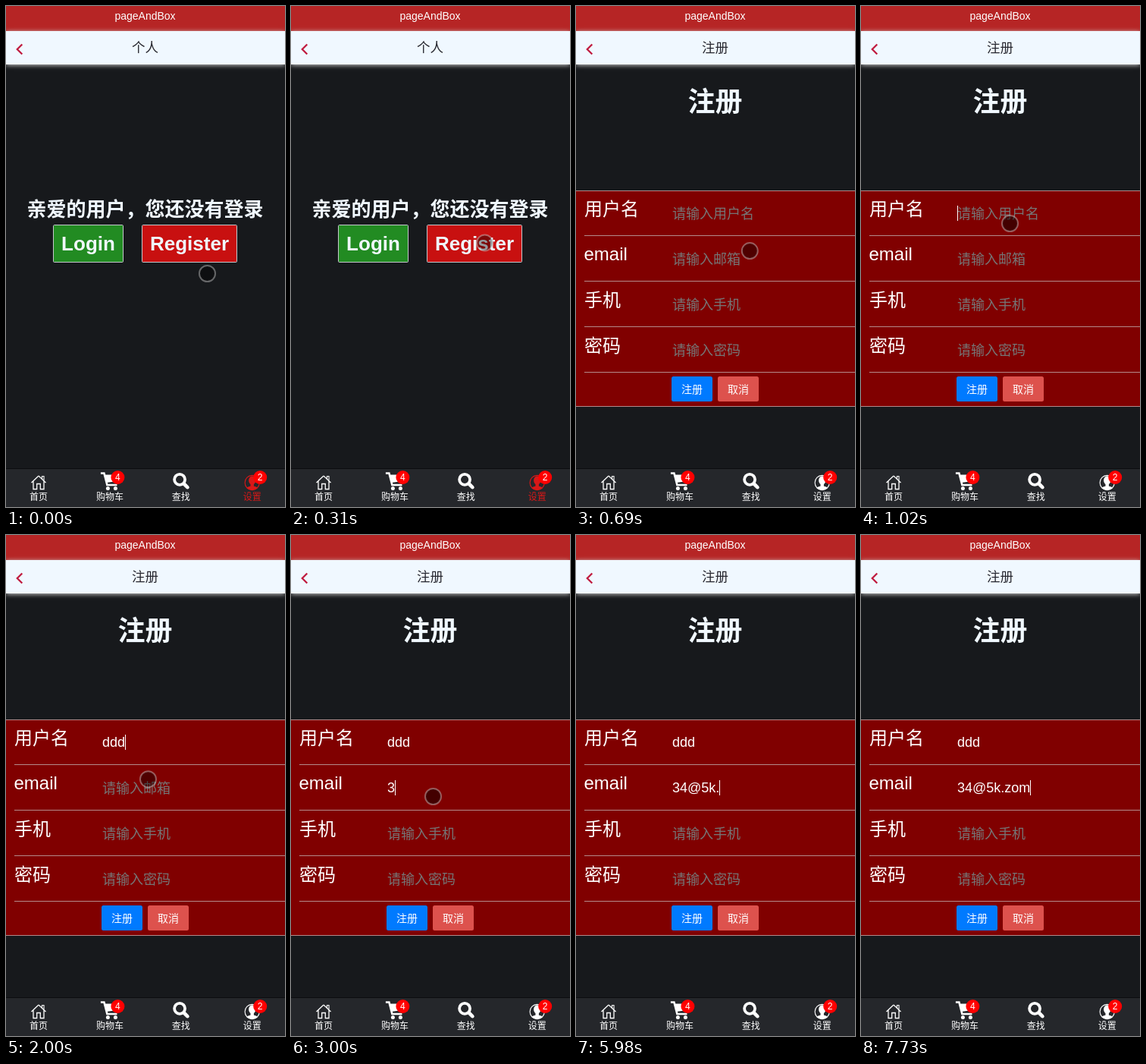
Animation of 368x660 px, one loop 8 s. Source, as an HTML page with a canvas:

```html
<!DOCTYPE html>
<html lang="zh-CN">
<head>
<meta charset="utf-8">
<title>注册</title>
<style>
html, body { margin: 0; width: 100%; height: 100%; overflow: hidden; background: #17191c; }
canvas { display: block; width: 368px; height: 660px; }
</style>
</head>
<body>
<canvas id="stage"></canvas>
<script>
const W = 368, H = 660, LOOP = 8000, BLINK = 505, HIDE_POINTER = 4350;
const FONT = '"Liberation Sans", Arial, "Noto Sans CJK SC", "Noto Sans CJK", sans-serif';
const ICE = '#f0f8ff', WHITE = '#fff', LINE = '#b48a8a';

const canvas = document.getElementById('stage');
const ctx = canvas.getContext('2d');
const dpr = window.devicePixelRatio || 1;
canvas.width = W * dpr;
canvas.height = H * dpr;

// Pointer: move along a curve, then tap. Each move starts where the last one ended.
const HOME = { x: 265.5, y: 352.5 };
const MOVES = [
  { start: 0, end: 330, tap: 360, bend: { x: 260, y: 332 }, to: { x: 255.5, y: 311.5 } },
  { start: 480, end: 870, tap: 1020, bend: { x: 240, y: 350 }, to: { x: 196.5, y: 286.5 } },
  { start: 1740, end: 2260, tap: 2310, bend: { x: 183, y: 327.5 }, to: { x: 187.5, y: 344.5 } }
];
const [openTap, nameTap, emailTap] = MOVES.map(m => m.tap);

// Evenly typed bursts of characters
const burst = (start, gap, str) => [...str].map((char, i) => ({ char, at: start + i * gap }));

const FIELDS = [
  { label: '用户名', hint: '请输入用户名', focus: nameTap, blur: emailTap, keys: burst(1290, 215, 'ddd') },
  { label: 'email', hint: '请输入邮箱', focus: emailTap, blur: LOOP,
    keys: [burst(3000, 480, '34'), burst(4480, 0, '@'), burst(5500, 240, '5k.'), burst(7270, 230, 'zom')].flat() },
  { label: '手机', hint: '请输入手机', keys: [] },
  { label: '密码', hint: '请输入密码', keys: [] }
];

const clamp = v => Math.min(1, Math.max(0, v));
const smooth = u => u * u * (3 - 2 * u);
const bezier = (a, b, c, u) => (1 - u) * (1 - u) * a + 2 * u * (1 - u) * b + u * u * c;

function rect(x, y, w, h, fill) {
  ctx.fillStyle = fill;
  ctx.fillRect(x, y, w, h);
}

function text(str, x, y, size, color, align = 'left', weight = 400) {
  ctx.font = `${weight} ${size}px ${FONT}`;
  ctx.textAlign = align;
  ctx.fillStyle = color;
  ctx.fillText(str, x, y);
}

// Places Chinese text by its vertical middle
function hanzi(str, x, mid, size, color, align, weight) {
  text(str, x, mid + size * 0.38, size, color, align, weight);
}

function button(label, x, y, w, h, size, fill, border) {
  ctx.beginPath();
  ctx.roundRect(x, y, w, h, 2.5);
  ctx.fillStyle = border || fill;
  ctx.fill();
  if (border) rect(x + 1, y + 1, w - 2, h - 2, fill);
  text(label, x + w / 2, y + h / 2 + size * 0.36, size, border ? ICE : WHITE, 'center', border ? 700 : 500);
}

function disc(x, y, rx, color, ry = rx) {
  ctx.beginPath();
  ctx.ellipse(x, y, rx, ry, 0, 0, Math.PI * 2);
  ctx.fillStyle = color;
  ctx.fill();
}

function ring(x, y, r, color, width) {
  ctx.beginPath();
  ctx.arc(x, y, r, 0, Math.PI * 2);
  ctx.strokeStyle = color;
  ctx.lineWidth = width;
  ctx.stroke();
}

function line(path, color, width) {
  ctx.strokeStyle = color;
  ctx.lineWidth = width;
  ctx.stroke(new Path2D(path));
}

function header(title) {
  rect(0, 0, W, 33, '#b62525');
  ctx.save();
  ctx.shadowColor = '#ccc';
  ctx.shadowBlur = 6 * dpr;
  ctx.shadowOffsetY = dpr;
  rect(0, 33, W, 44, ICE);
  ctx.restore();
  text('pageAndBox', 183.5, 18, 14, WHITE, 'center');
  hanzi(title, 183.5, 54.5, 17.5, '#26262e', 'center');
  line('M21.3 50.5l-6.5 6.5l6.5 6.5', '#c01c40', 2.3);
}

// Icons are drawn around the origin
function homeIcon(color) {
  for (const side of [1, -1]) {
    ctx.save();
    ctx.scale(side, 1);
    line('M0-9l9.5 9M7-2v10.5h-4.7v-7h-2.3', color, 1.3);
    ctx.restore();
  }
  line('M4.5-5v-3.5h2.5v6', color, 1.1);
}

function cartIcon(color) {
  line('M-12-12.5h4.5l4 15.5h13', color, 2.6);
  ctx.fillStyle = color;
  ctx.fill(new Path2D('M-6.5-10.5h17.5l-2 8.5l-13.5 2z'));
  for (const x of [-2.5, 7.5]) disc(x, 7.5, 2.5, color);
}

function searchIcon(color) {
  ring(-1.7, -4.2, 7, color, 3.8);
  ctx.lineCap = 'round';
  line('M4 1.5l4.6 4.6', color, 4.6);
  ctx.lineCap = 'butt';
}

function personIcon(color) {
  ctx.save();
  ctx.beginPath();
  ctx.arc(0, 0, 10, 0, Math.PI * 2);
  ctx.clip();
  disc(0, -3, 4.6, color, 5.8);
  rect(-2.2, 0, 4.4, 6, color);
  disc(0, 9.5, 8.5, color, 5.2);
  ctx.restore();
  ring(0, 0, 9.6, color, 1.1);
}

const TABS = [
  { label: '首页', icon: homeIcon },
  { label: '购物车', icon: cartIcon, badge: 4 },
  { label: '查找', icon: searchIcon },
  { label: '设置', icon: personIcon, badge: 2 }
];

function tabs(active) {
  rect(0, 609, W, 1, '#0c0d0f');
  rect(0, 610, W, 50, '#25272b');
  TABS.forEach((tab, i) => {
    const color = i === active ? '#d81818' : WHITE;
    ctx.save();
    ctx.translate(43 + i * 93.9, 628);
    tab.icon(color);
    hanzi(tab.label, 0, 18.3, 12, color, 'center', 500);
    if (tab.badge) {
      disc(10.5, -7, 9, '#f00');
      text(tab.badge, 10.5, -2.7, 12, WHITE, 'center');
    }
    ctx.restore();
  });
}

function welcome() {
  hanzi('亲爱的用户，您还没有登录', 183.5, 267, 26, ICE, 'center', 700);
  button('Login', 62, 288, 93, 50, 26, '#228b22', '#c4c8cc');
  button('Register', 179, 288, 126, 50, 26, '#c81010', '#c4c8cc');
}

function caretOn(f, keys, t) {
  if (!(t >= f.focus && t < f.blur)) return false;
  const last = keys.length ? keys[keys.length - 1].at : f.focus;
  return Math.floor((t - last) / BLINK) % 2 === 0;
}

function field(f, i, t) {
  const y = 243 + i * 60;
  if (f.label === 'email') text(f.label, 10.5, y + 32, 24, WHITE);
  else hanzi(f.label, 11, y + 24, 24, WHITE, 'left', 500);
  rect(11, y + 59, W - 11, 1, LINE);

  const keys = f.keys.filter(k => t >= k.at);
  const typed = keys.map(k => k.char).join('');
  if (typed) text(typed, 127, y + 36, 18, WHITE);
  else hanzi(f.hint, 127, y + 30, 18, '#757575');
  if (caretOn(f, keys, t)) {
    rect(Math.floor(127 + ctx.measureText(typed).width), y + 20, 1, 20, WHITE);
  }
}

function form(t) {
  hanzi('注册', 183.5, 125, 36, ICE, 'center', 700);
  rect(0, 243, W, 285, LINE);
  rect(0, 244, W, 283, '#800000');
  FIELDS.forEach((f, i) => field(f, i, t));
  button('注册', 126, 488, 54, 33, 14, '#007aff');
  button('取消', 187, 488, 54, 33, 14, '#dd524d');
}

function pointer(t) {
  if (t >= HIDE_POINTER) return;
  const i = Math.max(0, MOVES.filter(m => t >= m.start).length - 1);
  const move = MOVES[i], from = i ? MOVES[i - 1].to : HOME;
  const u = smooth(clamp((t - move.start) / (move.end - move.start)));
  const x = bezier(from.x, move.bend.x, move.to.x, u);
  const y = bezier(from.y, move.bend.y, move.to.y, u);
  disc(x, y, 10.5, `rgba(0,0,0,${t >= move.tap ? 0.48 : 0.38})`);
  ring(x, y, 10.5, 'rgba(205,205,205,0.45)', 2);
}

function draw(t) {
  const opened = t >= openTap;
  ctx.setTransform(dpr, 0, 0, dpr, 0, 0);
  rect(0, 0, W, H, '#17191c');
  header(opened ? '注册' : '个人');
  if (opened) form(t);
  else welcome();
  tabs(opened ? -1 : 3);
  pointer(t);
}

const begin = performance.now();
function tick() {
  draw((performance.now() - begin) % LOOP);
  requestAnimationFrame(tick);
}
tick();
</script>
</body>
</html>
```
